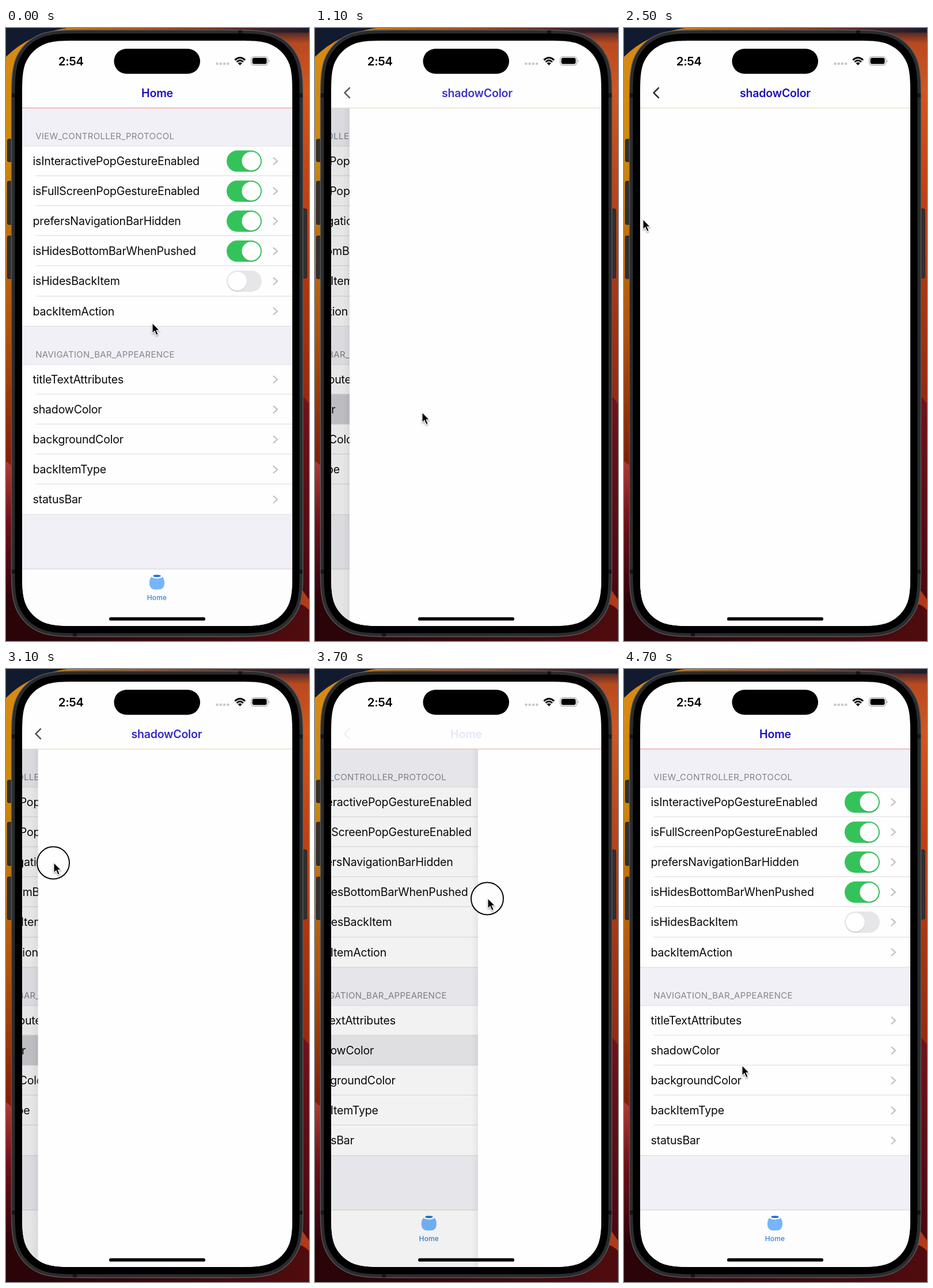
An HTML page that plays this animation: 526 by 1064 pixels, repeating every 4.8 s.

```html
<!DOCTYPE html>
<html lang="en">
<head>
<meta charset="utf-8">
<title>Navigation demo</title>
<style>
  html, body { margin: 0; width: 100%; height: 100%; overflow: hidden; background: #2a0409; }
  svg { display: block; width: 100vw; height: 100vh; }
  text { font-family: Inter, "Liberation Sans", sans-serif; }
  .row { font-size: 19.6px; letter-spacing: -.22px; fill: #0a0a0a; }
  .head { font-size: 15px; letter-spacing: .3px; fill: #858589; }
  .title { font-size: 19.6px; font-weight: 600; letter-spacing: -.25px; fill: #1a0fbf; text-anchor: middle; }
  .tab { font-size: 12px; font-weight: 500; letter-spacing: .15px; fill: #2f84d8; text-anchor: middle; }
  .clock { font-size: 20.6px; font-weight: 600; letter-spacing: -.5px; }
  .line { stroke: #dcdce0; stroke-width: 1; }
  .stroke { fill: none; stroke-linecap: round; stroke-linejoin: round; }
  #cursor { filter: drop-shadow(0 2px 1.5px rgba(0, 0, 0, .35)); }
</style>
</head>
<body>
<svg viewBox="0 0 526 1064" preserveAspectRatio="none">
  <defs>
    <linearGradient id="wallLeft" x2="0" y2="1">
      <stop offset="0" stop-color="#d98a14"/><stop offset=".2" stop-color="#cf8a0c"/>
      <stop offset=".32" stop-color="#c2740e"/><stop offset=".5" stop-color="#b0520a"/>
      <stop offset=".7" stop-color="#842008"/>
    </linearGradient>
    <linearGradient id="wallRight" x2="0" y2="1">
      <stop offset="0" stop-color="#2a1c28"/><stop offset=".025" stop-color="#b84a20"/>
      <stop offset=".1" stop-color="#d2561d"/><stop offset=".3" stop-color="#bb3f12"/>
      <stop offset=".6" stop-color="#982a10"/>
    </linearGradient>
    <linearGradient id="wallTop">
      <stop offset="0" stop-color="#c97a14"/><stop offset=".4" stop-color="#a8481a"/>
      <stop offset=".75" stop-color="#4a2226"/><stop offset="1" stop-color="#1a1c2e"/>
    </linearGradient>
    <linearGradient id="petalLeft" x2="0" y2="1">
      <stop offset="0" stop-color="#b03a30"/><stop offset=".35" stop-color="#6d0f18"/>
      <stop offset=".8" stop-color="#2a0409"/>
    </linearGradient>
    <linearGradient id="petalRight" x2="0" y2="1">
      <stop offset="0" stop-color="#76121a"/><stop offset=".8" stop-color="#4c0810"/>
    </linearGradient>
    <linearGradient id="floor"><stop stop-color="#2a0409"/><stop offset="1" stop-color="#500c0e"/></linearGradient>
    <linearGradient id="edge">
      <stop stop-color="#000" stop-opacity="0"/><stop offset="1" stop-color="#000" stop-opacity=".05"/>
    </linearGradient>
    <clipPath id="screen"><path id="screenShape"/></clipPath>
  </defs>

  <g id="wallpaper">
    <rect width="300" height="1064" fill="url(#wallLeft)"/>
    <rect x="300" width="226" height="1064" fill="url(#wallRight)"/>
    <rect x="100" width="426" height="8" fill="url(#wallTop)"/>
    <path d="M0 0H106Q40 10 0 50Z" fill="#121a30"/>
    <path d="M0 752Q20 764 60 830V1064H0Z" fill="url(#petalLeft)"/>
    <path d="M526 652Q512 632 490 620V1064H526Z" fill="url(#petalRight)"/>
    <path d="M60 1040H440Q500 1010 514 972L526 992V1064H60Z" fill="url(#floor)"/>
    <path d="M512 972L526 992V1010Q516 1000 510 1000Z" fill="#b23a18"/>
  </g>

  <g id="phone">
    <g fill="#303033" stroke="#1a1a1c">
      <rect x="2.5" y="193" width="10" height="39" rx="2"/>
      <rect x="2.5" y="266" width="10" height="75" rx="2"/>
      <rect x="2.5" y="361" width="10" height="74" rx="2"/>
      <rect x="512" y="314" width="10" height="120" rx="2"/>
    </g>
    <path id="frame" fill="#2b2c2e" stroke="#5a5b5d" stroke-width="1.3"/>
    <path d="M10 117H16M509 117H515M10 943.5H16M509 943.5H515M406.5 4V10M119.5 1050V1056" stroke="#161617" stroke-width="7"/>
    <path id="bezel"/>
  </g>

  <g clip-path="url(#screen)">
    <rect x="28" y="22" width="469" height="1016" fill="#fefefe"/>
    <g id="home">
      <rect x="28" y="139" width="469" height="800" fill="#f1f0f6"/>
      <g id="list"></g>
      <rect x="28" y="939" width="469" height="100" fill="#fdfdfd"/>
      <path class="line" d="M28 939H497" style="stroke:#cfcfd3"/>
      <path d="M252.500 952.500C247 958 247 974.500 258 974.500H266C277 974.500 277 958 271.500 952.500Z" fill="#76b5fb"/>
      <ellipse cx="262" cy="952" rx="9.500" ry="3.700" fill="#fdfdfd"/>
      <ellipse cx="262" cy="951" rx="6.800" ry="2" fill="#1d72dc"/>
      <text class="tab" x="262" y="993">Home</text>
    </g>
    <rect id="dim" x="28" y="139" width="469" height="900"/>
    <g id="page">
      <rect id="pageEdge" x="16" y="139" width="12" height="900" fill="url(#edge)"/>
      <rect x="28" y="139" width="469" height="900" fill="#fefefe"/>
    </g>
    <path id="navLine" d="M28 138.800H497" stroke-width="1.200"/>
    <text id="homeTitle" class="title" x="262.500" y="119.600">Home</text>
    <text id="pageTitle" class="title" x="262.500" y="119.600">shadowColor</text>
    <path id="back" class="stroke" d="M60 104L51.500 112.500L60 121" stroke="#303030" stroke-width="2.500"/>

    <text class="clock" x="90.800" y="64.800">2:54</text>
    <rect x="187.500" y="36" width="149.500" height="43.500" rx="21.750"/>
    <g fill="#c8c8ca">
      <circle cx="366.500" cy="62" r="2.300"/><circle cx="372.700" cy="62" r="2.300"/>
      <circle cx="379" cy="62" r="2.300"/><circle cx="385.300" cy="62" r="2.300"/>
    </g>
    <path d="M397.300 55.600Q406.200 47.400 415.100 55.600M400.500 59Q406.200 53.700 411.900 59" fill="none" stroke="#000" stroke-width="2.900"/>
    <path d="M402.600 61Q406.200 58 409.800 61L406.200 64.800Z"/>
    <rect x="425.600" y="49.800" width="29" height="14.800" rx="4.600" fill="none" stroke="#a2a2a4" stroke-width="1.200"/>
    <rect x="427.600" y="51.800" width="25" height="10.800" rx="3"/>
    <path d="M456.200 54.700Q459 57.200 456.200 59.700Z" fill="#a2a2a4"/>
    <rect x="179" y="1022.800" width="167" height="5.800" rx="2.900"/>
  </g>

  <circle id="touch" r="28" fill="#fefefe" stroke="#0a0a0a" stroke-width="2"/>
  <path id="cursor" d="M0 0V17.600L4 13.900L7 21L10.200 19.700L7.200 12.800H12.600Z" stroke="#fff" stroke-width="1.100"/>
</svg>

<script>
const LOOP = 4800, STEP = 100, WIDTH = 469, ROW = 52.1;
const $ = id => document.getElementById(id);

// Rectangle whose corners ease into the sides instead of meeting them as plain arcs.
function smoothRect(x, y, w, h, r) {
  const curve = [[1.53, 0], [1.09, 0], [.87, 0], [.63, .075], [.37, .17], [.17, .37], [.075, .63], [0, .87], [0, 1.09], [0, 1.53]];
  const corner = (flipX, flipY, reverse) => {
    const points = curve.map(([u, v]) =>
      `${flipX ? x + w - u * r : x + u * r} ${flipY ? y + h - v * r : y + v * r}`);
    if (reverse) points.reverse();
    return `L${points[0]}C${points.slice(1).join(' ')}`;
  };
  const path = corner(0, 0, true) + corner(1, 0) + corner(1, 1, true) + corner(0, 1);
  return `M${path.slice(1)}Z`;
}

$('screenShape').setAttribute('d', smoothRect(28, 22, 469, 1016, 65.6));
$('bezel').setAttribute('d', smoothRect(15.5, 9.5, 494, 1041, 78));
$('frame').setAttribute('d', smoothRect(9.5, 3.5, 506, 1053, 84));

const sections = [
  { head: 'VIEW_CONTROLLER_PROTOCOL', top: 205, rows: [
    ['isInteractivePopGestureEnabled', 'on'], ['isFullScreenPopGestureEnabled', 'on'],
    ['prefersNavigationBarHidden', 'on'], ['isHidesBottomBarWhenPushed', 'on'],
    ['isHidesBackItem', 'off'], ['backItemAction']] },
  { head: 'NAVIGATION_BAR_APPEARENCE', top: 584, rows: [
    ['titleTextAttributes'], ['shadowColor'], ['backgroundColor'], ['backItemType'], ['statusBar']] },
];

function toggle(state, y) {
  const on = state === 'on';
  const knob = on ? 425.7 : 401.5;
  return `<rect x="383" y="${y - 18.5}" width="61" height="37" rx="18.5" fill="${on ? '#34c35a' : '#e6e6e8'}"/>
    <circle cx="${knob}" cy="${y + 1.5}" r="16.5" fill="#000" opacity=".1"/>
    <circle cx="${knob}" cy="${y}" r="16.3" fill="#fff"/>`;
}

function row([label, state], index, top, last) {
  const y = top + index * ROW, mid = y + ROW / 2;
  const selected = label === 'shadowColor'
    ? `<rect id="selected" x="28" y="${y}" width="469" height="${ROW}" fill="#d0cfd4"/>` : '';
  return `${selected}
    <path class="line" d="M${last ? 28 : 51.8} ${Math.round(y + ROW) - .5}H497"/>
    <text class="row" x="46.6" y="${mid + 7}">${label}</text>
    ${state ? toggle(state, mid) : ''}
    <path class="stroke" d="M464.5 ${mid - 5.8}L471 ${mid}L464.5 ${mid + 5.8}" stroke="rgba(60, 60, 67, .3)" stroke-width="2.3"/>`;
}

$('list').innerHTML = sections.map(({ head, top, rows }) => `
  <text class="head" x="51.2" y="${top - 12.5}">${head}</text>
  <rect x="28" y="${top}" width="469" height="${rows.length * ROW}" fill="#fefefe"/>
  <path class="line" d="M28 ${top}H497"/>
  ${rows.map((r, i) => row(r, i, top, i === rows.length - 1)).join('')}`).join('');

// Each step: time, values..., with an optional 'ease' for the way to the next step.
const pointer = [
  [0, 254, 512, 'ease'], [600, 186, 667], [1400, 186, 667, 'ease'], [2400, 33, 332],
  [2700, 33, 332], [2800, 42, 333], [3400, 124, 339], [3500, 180, 355], [3600, 245, 378],
  [3700, 300, 398], [3800, 325, 408], [3900, 330, 410], [4000, 330, 412, 'ease'], [4600, 205, 688],
];
const offsets = [
  [800, 469], [900, 449], [1000, 175], [1100, 32], [1200, 5], [1300, 0], [2900, 0],
  [3400, 69], [3500, 125], [3600, 190], [3700, 255], [3800, 400], [3900, 461], [4000, 469],
];

function sample(steps, t) {
  const next = steps.findIndex(s => s[0] > t);
  if (next === 0) return steps[0].slice(1);
  if (next < 0) return steps[steps.length - 1].slice(1);
  const a = steps[next - 1], b = steps[next];
  let k = (t - a[0]) / (b[0] - a[0]);
  if (a[a.length - 1] === 'ease') k = k * k * (3 - 2 * k);
  return b.slice(1).map((v, i) => typeof v === 'number' ? a[i + 1] + (v - a[i + 1]) * k : v);
}

const clamp = v => Math.max(0, Math.min(1, v));
const mix = (a, b, k) => `rgb(${a.map((v, i) => Math.round(v + (b[i] - v) * k))})`;
const move = (id, x, y = 0) => $(id).setAttribute('transform', `translate(${x} ${y})`);
const fade = (id, alpha) => $(id).setAttribute('opacity', clamp(alpha));

function draw(t) {
  const [x, y] = sample(pointer, t);
  const [offset] = sample(offsets, t);
  const p = offset / WIDTH;

  move('home', -.3 * (WIDTH - offset));
  move('page', offset);
  fade('pageEdge', offset > 0 && offset < WIDTH ? 1 : 0);
  fade('dim', .1 * (1 - p));
  fade('selected', t < 900 ? 0 : t < 2900 ? 1 : 1 - p);

  move('pageTitle', .59 * offset);
  fade('pageTitle', 1 - 33 * p * p);
  fade('homeTitle', (p - .5) / .45);
  fade('back', (1 - p) ** 3.5);
  $('navLine').setAttribute('stroke', mix([226, 223, 206], [238, 152, 152], p));

  move('cursor', x, y);
  move('touch', x - 1, y + .5);
  fade('touch', t >= 2700 && t < 3800 ? 1 : 0);
}

const start = performance.now();
function tick() {
  const t = (performance.now() - start) % LOOP;
  draw(Math.floor(t / STEP) * STEP);
  requestAnimationFrame(tick);
}
tick();
</script>
</body>
</html>
```
